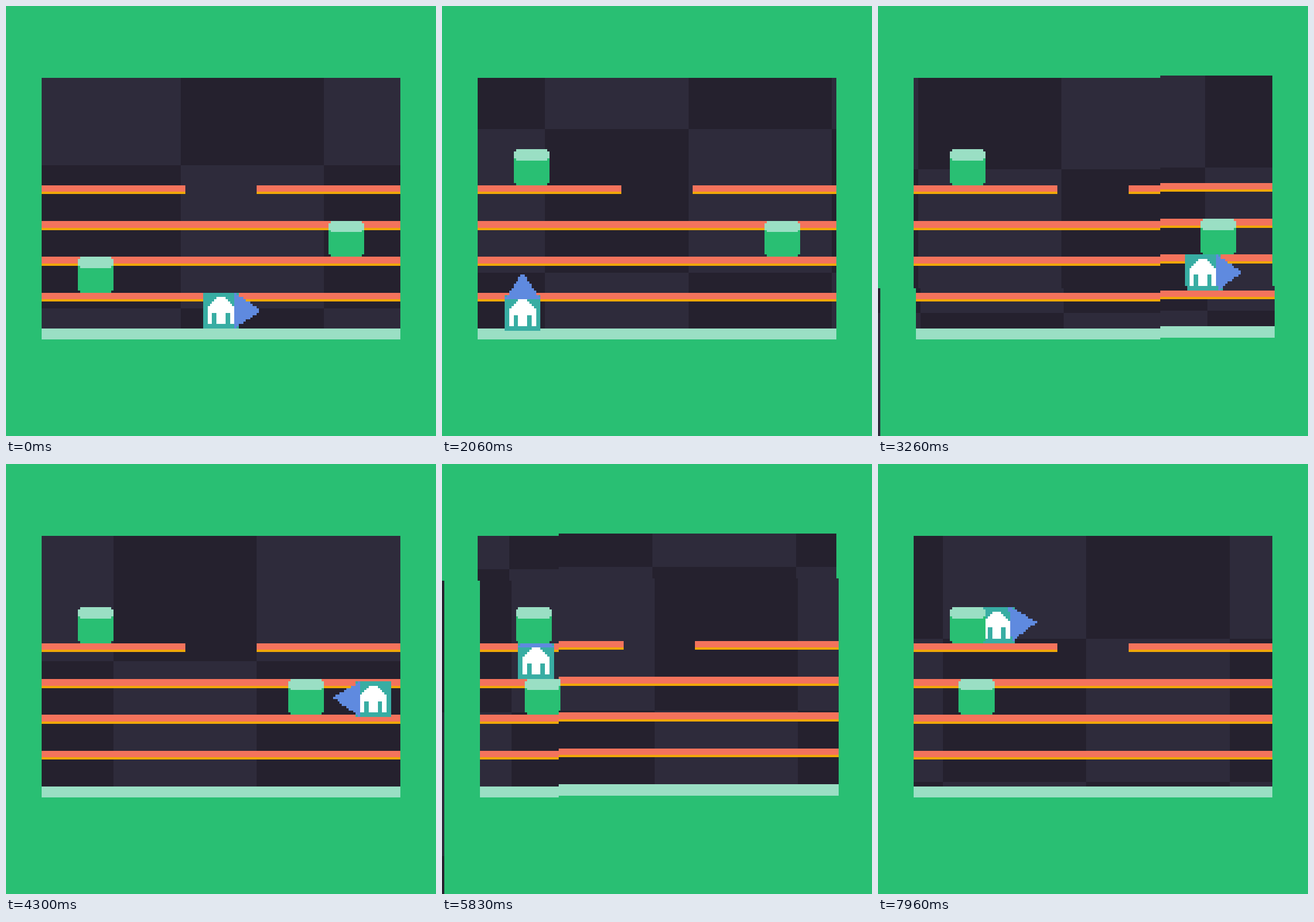
Write an HTML page with a canvas that moves like this. It is 748 px wide and 748 px high and loops after 8000 ms.

```html
<!DOCTYPE html>
<html lang="en">
<head>
<meta charset="utf-8">
<title>Roof kick</title>
<style>
  html, body { margin: 0; width: 100%; height: 100%; overflow: hidden; background: #29bf73; }
  canvas { display: block; width: 748px; height: 748px; image-rendering: pixelated; }
</style>
</head>
<body>
<canvas id="screen" width="192" height="192"></canvas>
<script>
const SIZE = 192, PAD = 4, SPAN = SIZE + PAD * 2, LOOP = 8000;
const GREEN = '#29bf73', MINT = '#9adfc4', RED = '#f4735c', ORANGE = '#f0a808',
      TEAL = '#38ada3', BLUE = '#5f8adf', WHITE = '#fff', DARK = '#25212e', DUSK = '#2e2b3b';
const STOREY = 16, FLOOR = 144, SPEED = 0.106, TURN = 0.018;
const CLIMB_TIME = 450, CLIMB_ARC = 22;

const screen = document.getElementById('screen').getContext('2d');
const makeLayer = () => {
  const canvas = document.createElement('canvas');
  canvas.width = canvas.height = SPAN;
  return canvas.getContext('2d');
};
const scene = makeLayer(), sheared = makeLayer();
scene.translate(PAD, PAD);

const clamp = u => Math.max(0, Math.min(1, u));

function rect(color, x, y, w, h) {
  scene.fillStyle = color;
  scene.fillRect(Math.round(x), Math.round(y), w, h);
}

// Orders for the house: walk to a column; an order to stay put makes the roof look up.
const orders = [
  { at: 500, go: 28 }, { at: 1060, go: 28 }, { at: 2232, go: 160 },
  { at: 4050, go: 156 }, { at: 4300, go: 33 }, { at: 5460, go: 33 },
  { at: 6281, go: 61 }, { at: 6710, go: 45 }, { at: 6870, go: 45 }, { at: 7800, go: 45.4 },
];
const climbs = [2500, 3600, 5000, 6340];
const landings = climbs.slice(0, 3).map(start => start + CLIMB_TIME);
const jolts = [1620, ...landings, 5760, 6104];

// Follows the orders up to time t: steady walking, exponential turning.
function walk(t) {
  let x = 88, angle = 0, previous = x;
  orders.forEach(({ at, go }, i) => {
    if (t < at) return;
    const next = orders[i + 1];
    const spent = Math.min(t, next ? next.at : LOOP) - at;
    const heading = go === previous ? 270 : go < previous ? 180 : i ? 360 : 0;
    angle = heading + (angle - heading) * Math.exp(-TURN * spent);
    x += Math.sign(go - x) * Math.min(Math.abs(go - x), SPEED * spent);
    previous = go;
  });
  return { x, angle: angle * Math.PI / 180 };
}

function height(t) {
  return climbs.reduce((y, start) => {
    const u = clamp((t - start) / CLIMB_TIME);
    return y - STOREY * u - 4 * CLIMB_ARC * u * (1 - u);
  }, FLOOR - STOREY);
}

// The left box is thrown up twice, then drops back onto its ledge.
function leftBox(t) {
  const ledge = 64, ceiling = 33;
  const thrown = (start, from, to) => to + (from - to) * Math.exp(-0.0104 * Math.max(0, t - start));
  if (t < 5950) return [32, thrown(1600, 112, ledge)];
  const fall = Math.max(0, t - 6590) / 1000;
  const y = Math.min(ledge, thrown(5950, ledge, ceiling) + 200 * fall * fall);
  return [y < ledge ? 31 : 32, y];
}

const rightBoxX = t => 144 - 108 * clamp((t - 4100) / 1200);

function tilt(t) {
  const age = (t - Math.max(...jolts.filter(start => start <= t))) / 1000;
  return age < 0.5 ? 0.0121 * Math.exp(-age / 0.303) * Math.sin(24 * age) : 0;
}

function drawBackdrop(t) {
  const cell = 64, scroll = t < 500 ? 14 : 110.2 + 0.02955 * (t - 2060);
  const left = Math.round(scroll), top = Math.round(scroll / 2);
  rect(DARK, -PAD, -PAD, SPAN, SPAN);
  for (let i = -7; i < 4; i++)
    for (let j = -5; j < 4; j++)
      if ((i + j) % 2 === 0) rect(DUSK, left + i * cell, top + j * cell, cell, cell);
}

function drawRoom() {
  rect(GREEN, 0, -PAD, SIZE, 32 + PAD);
  rect(GREEN, 0, FLOOR + 5, SIZE, SIZE);
  rect(GREEN, 0, 32, 16, 117);
  rect(GREEN, 176, 32, 16, 117);
  rect(MINT, 16, FLOOR, 160, 5);
  const ledge = (x, y, w) => {
    rect(RED, x, y, w, 3);
    rect(ORANGE, x, y + 3, w, 1);
  };
  ledge(16, 80, 64);
  ledge(112, 80, 64);
  for (let y = 96; y < FLOOR; y += STOREY) ledge(16, y, 160);
}

function drawBox(x, y) {
  x = Math.round(x);
  y = Math.round(y);
  rect(GREEN, x, y + 4, 16, 11);
  rect(GREEN, x + 1, y + 15, 14, 1);
  rect(MINT, x + 1, y, 14, 5);
  rect(MINT, x, y + 1, 16, 3);
}

function drawRoof(cx, cy, angle) {
  const base = 6, tip = 18, c = Math.cos(angle), s = Math.sin(angle);
  for (let py = -tip; py < tip; py++)
    for (let px = -tip; px < tip; px++) {
      const dx = px + 0.5, dy = py + 0.5;
      const out = dx * c + dy * s, side = Math.abs(dy * c - dx * s);
      if (out > base && side <= (tip - out) * 2 / 3 + 1e-6) rect(BLUE, cx + px, cy + py, 1, 1);
    }
}

function drawHouse(t) {
  const pose = walk(t), x = Math.round(pose.x);
  // A camera tilt to the right tips the house over to the next pixel row.
  const y = Math.round(height(t) + 0.49 - tilt(t) * 10);
  rect(TEAL, x, y, 16, 16);
  for (let i = 0; i < 4; i++) rect(WHITE, x + 6 - i, y + 2 + i, 4 + 2 * i, 1);
  rect(WHITE, x + 2, y + 6, 12, 8);
  rect(TEAL, x + 4, y + 9, 2, 5);
  rect(TEAL, x + 10, y + 9, 2, 5);
  drawRoof(x + 8, y + 8, pose.angle);
}

// Tilt on the pixel grid: rows past the split step sideways, columns step up or down.
function present(t) {
  const angle = tilt(t), step = Math.sign(angle);
  const split = Math.round(0.5 / Math.max(Math.abs(angle), 1e-6));
  if (split > 170) {
    screen.drawImage(scene.canvas, -PAD, -PAD);
    return;
  }
  const cut = split + PAD, rest = SPAN - cut;
  sheared.drawImage(scene.canvas, 0, 0);
  sheared.drawImage(scene.canvas, 0, cut, SPAN, rest, step, cut, SPAN, rest);
  screen.drawImage(sheared.canvas, -PAD, -PAD);
  screen.drawImage(sheared.canvas, cut, 0, rest, SPAN, split, -PAD - step, rest, SPAN);
}

function render(t) {
  drawBackdrop(t);
  drawRoom();
  drawHouse(t);
  drawBox(...leftBox(t));
  drawBox(rightBoxX(t), 96);
  present(t);
}

let began;
function tick(now) {
  began ??= now;
  render((now - began) % LOOP);
  requestAnimationFrame(tick);
}
render(0);
requestAnimationFrame(tick);
</script>
</body>
</html>
```
